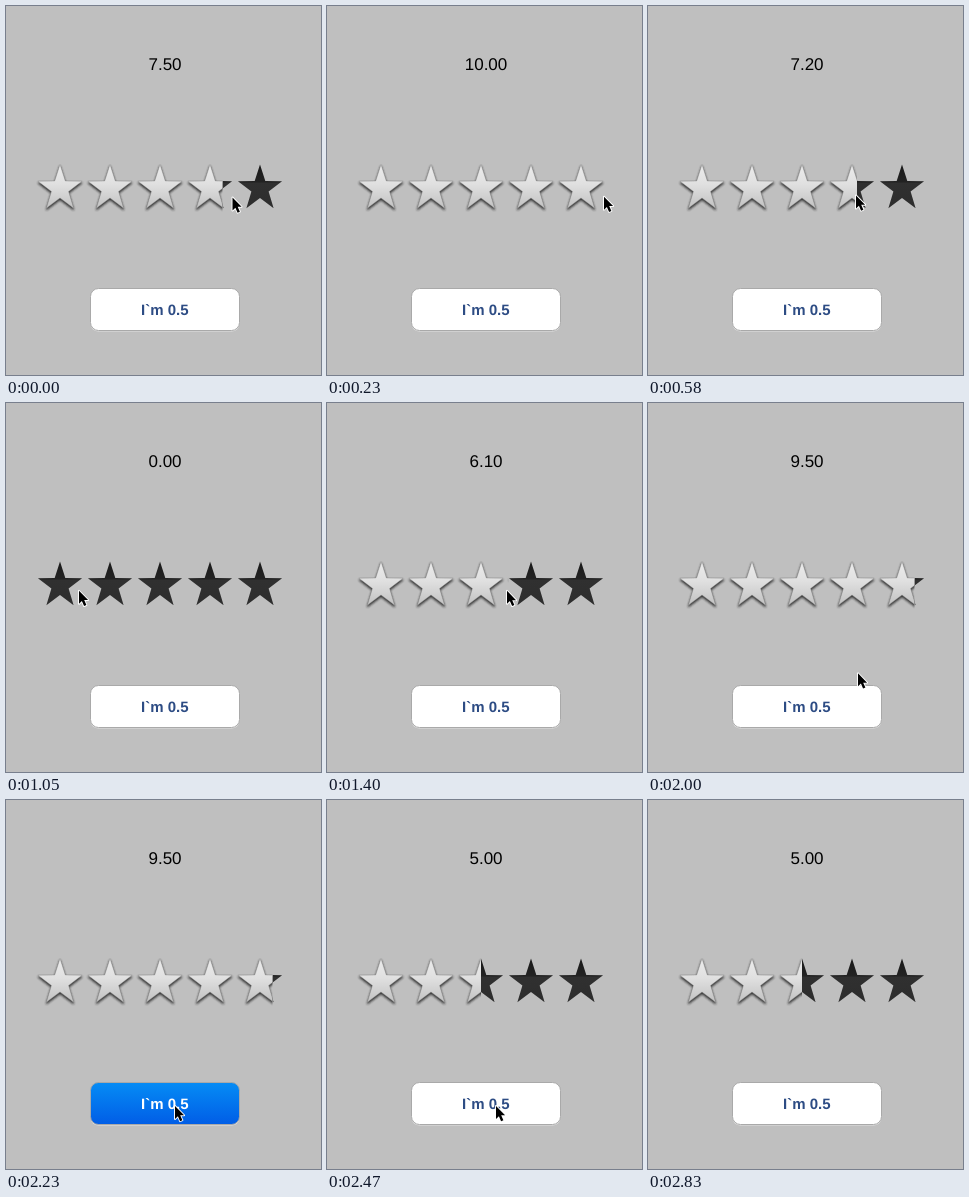
These frames come from a looping animation (315 by 369 pixels, 3280 ms). An HTML page:

```html
<!DOCTYPE html>
<html lang="en">
<head>
<meta charset="utf-8">
<title>Star rating</title>
<style>
  html, body { margin: 0; width: 100%; height: 100%; overflow: hidden; background: #bfbfbf; }
  svg { display: block; width: 100%; height: 100%; }
  text { font-family: "Liberation Sans", Arial, sans-serif; text-anchor: middle; text-rendering: geometricPrecision; }
</style>
</head>
<body>
<svg viewBox="0 0 315 369">
  <defs>
    <linearGradient id="dark" x2="0" y2="1">
      <stop offset="0" stop-color="#191919"/>
      <stop offset=".4" stop-color="#222"/>
      <stop offset=".43" stop-color="#303030"/>
      <stop offset="1" stop-color="#2d2d2d"/>
    </linearGradient>
    <linearGradient id="light" x2="0" y2="1">
      <stop offset="0" stop-color="#ececec"/>
      <stop offset=".45" stop-color="#e0e0e0"/>
      <stop offset="1" stop-color="#c2c2c2"/>
    </linearGradient>
    <linearGradient id="blue" x2="0" y2="1">
      <stop offset="0" stop-color="#058cf5"/>
      <stop offset="1" stop-color="#015de6"/>
    </linearGradient>
    <filter id="blur" x="-20%" y="-20%" width="140%" height="140%">
      <feGaussianBlur stdDeviation=".9"/>
    </filter>
    <path id="star"/>
    <path id="arrow" d="M0 0V13L2.9 10.2 5.1 15.2 7.4 14.2 5.2 9.3H9.1Z"/>
    <clipPath id="lit"><rect id="litBox" y="150" height="65"/></clipPath>
    <clipPath id="unlit"><rect id="unlitBox" y="150" width="315" height="65"/></clipPath>
  </defs>
  <rect width="315" height="369" fill="#bfbfbf"/>
  <text id="score" x="159" y="64" font-size="17"></text>
  <g id="off" clip-path="url(#unlit)"></g>
  <g id="on" clip-path="url(#lit)"></g>
  <rect x="84.5" y="283.5" width="149" height="42" rx="8" fill="#e2e2e2"/>
  <rect id="button" x="84.5" y="282.5" width="149" height="42" rx="8" stroke="#a9a9a9"/>
  <text id="label" x="158.8" y="309" font-size="15" font-weight="bold">I`m 0.5</text>
  <g id="cursor">
    <use href="#arrow" stroke="#fff" stroke-width="1.9" stroke-linejoin="round"/>
    <use href="#arrow"/>
  </g>
</svg>
<script>
const $ = id => document.getElementById(id);
const LOOP = 3280, TICK = 117.8, LEAD = 14;
const PRESS = 19, RELEASE = 20, LEAVE = 24;

// Key points as [tick, value], linear in between
const pathX = [[0, 226.5], [2, 277], [5, 208], [8, 15], [9, 73], [12, 180], [14, 295], [15, 292], [18, 169], [22, 169], [23, 191]];
const pathY = [[0, 191.5], [11, 187], [14, 189.5], [15, 199], [18, 306], [22, 306], [23, 317]];
const rating = [[0, 7.5], [2, 10], [5, 7.2], [8, 0], [10, 0], [12, 6.1], [14, 9.5], [PRESS, 9.5], [RELEASE + 1, 5]];

function at(track, n) {
  const i = track.findIndex(key => key[0] > n);
  if (i < 0) return track.at(-1)[1];
  const [[n0, a], [n1, b]] = [track[i - 1], track[i]];
  return a + (b - a) * (n - n0) / (n1 - n0);
}

function starPath(r) {
  const points = Array.from({ length: 10 }, (_, i) => {
    const a = i * Math.PI / 5, d = i % 2 ? r * 0.39 : r;
    return `${d * Math.sin(a) * 0.97} ${-d * Math.cos(a) * 1.01}`;
  });
  return `M${points.join("L")}Z`;
}

const star = (x, fill, extra = "") =>
  `<use href="#star" x="${x}" y="182.6" fill="${fill}" ${extra}/>`;
const row = draw => Array.from({ length: 5 }, (_, i) => draw(54 + 50 * i)).join("");

$("star").setAttribute("d", starPath(23.9));
$("off").innerHTML = row(x => star(x, "url(#dark)"));
$("on").innerHTML = row(x =>
  `<g transform="translate(0 1.8)">${star(x, "#222", 'stroke="#222" opacity=".85" filter="url(#blur)"')}</g>` +
  star(x, "url(#light)", 'stroke="#8a8a8a" stroke-width=".4"'));

function set(id, attrs) {
  for (const k in attrs) $(id).setAttribute(k, attrs[k]);
}

function render(ms) {
  const n = Math.floor((ms % LOOP + LEAD) / TICK);
  const lit = at(rating, n);
  const score = n < RELEASE ? lit : 5;
  const cut = lit && 29 + 25 * lit;
  const pressed = n === PRESS;
  $("score").textContent = score.toFixed(1) + "0";
  set("litBox", { width: cut });
  set("unlitBox", { x: cut });
  set("button", { fill: pressed ? "url(#blue)" : "#fff" });
  set("label", { fill: pressed ? "#fff" : "#2d4c84" });
  set("cursor", {
    transform: `translate(${at(pathX, n)} ${at(pathY, n)})`,
    visibility: n < LEAVE ? "visible" : "hidden"
  });
}

const start = performance.now();
function tick() {
  render(performance.now() - start);
  requestAnimationFrame(tick);
}
tick();
</script>
</body>
</html>
```
